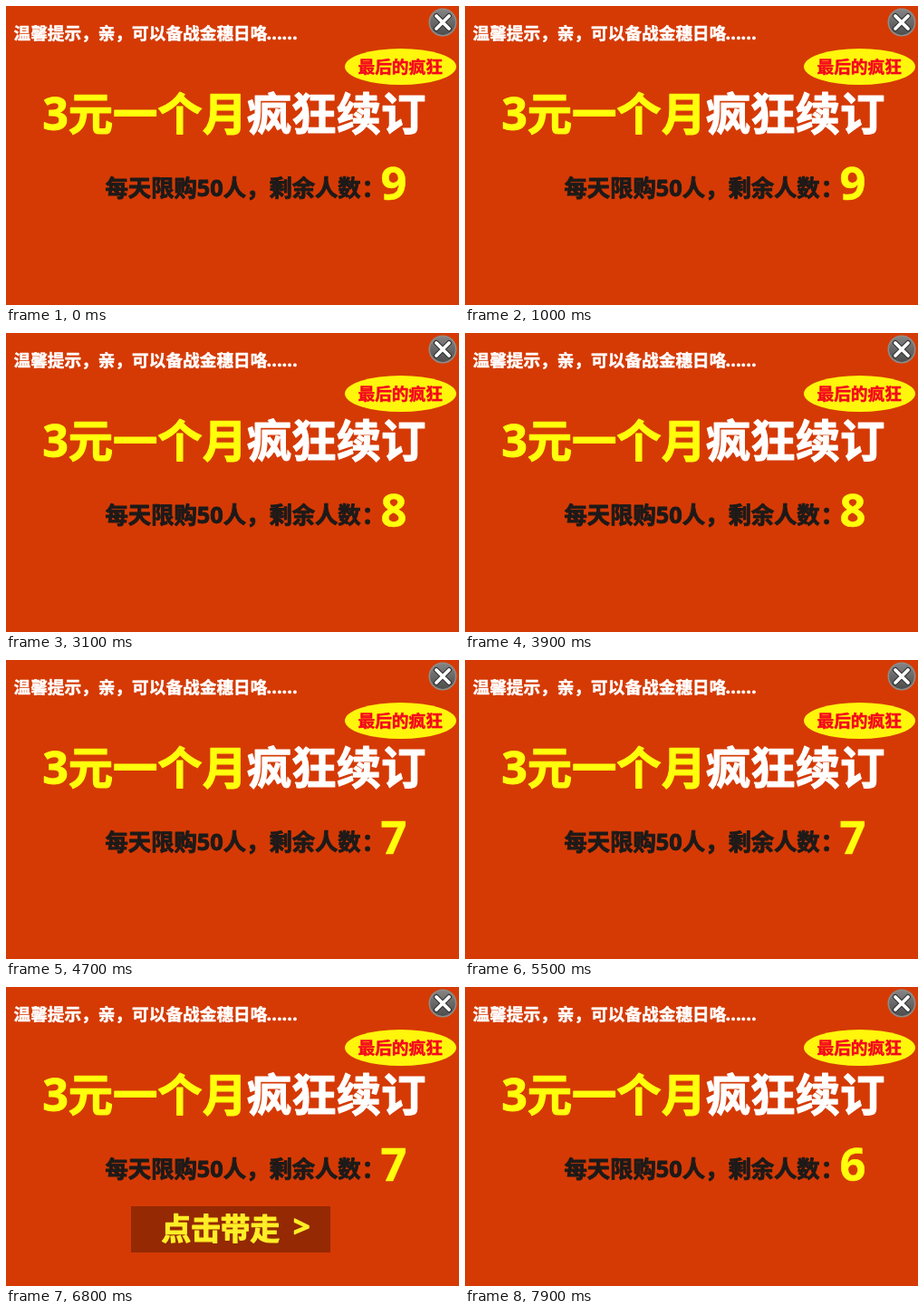
Animation of 500x330 px, one loop 8000 ms. Source, as an HTML page:

```html
<!DOCTYPE html>
<html lang="zh-CN">
<head>
<meta charset="utf-8">
<style>
html, body { margin: 0; width: 100%; height: 100%; overflow: hidden; background: #d53a04; }
svg { display: block; width: 500px; height: 330px; }
text {
  font: bold 18.67px "Open Sans", "Noto Sans CJK SC", "Noto Sans CJK", sans-serif;
  white-space: pre; stroke-linejoin: round; stroke-width: .5;
}
.yellow { fill: #ffff0c; stroke: #ffff0c; }
.white { fill: #fff; stroke: #fff; }
.red { fill: #f5081c; stroke: #f5081c; }
.dark { fill: #1d1a19; stroke: #1d1a19; stroke-width: .9; font-size: 25.33px; }
.title { font-size: 49.33px; stroke-width: 1.2; }
#count { font-size: 50.67px; }
#button text { fill: #ffee26; stroke: #ffee26; stroke-width: 1.2; font-size: 32.7px; }
#button .label { font-weight: 900; }
</style>
</head>
<body>
<svg viewBox="0 0 500 330">
  <defs>
    <linearGradient id="steel" x2="0" y2="1">
      <stop stop-color="#858585"/>
      <stop offset="1" stop-color="#4c4c4c"/>
    </linearGradient>
    <path id="cross" d="M475 11l14 14M489 11l-14 14" stroke-linecap="round"/>
  </defs>
  <rect width="500" height="330" fill="#d53a04"/>

  <text class="white" x="8.5" y="36.5">温馨提示，亲，可以备战金穗日咯</text>
  <text class="white" x="287.5" y="36.5" style="font-size:20px">......</text>

  <circle cx="482" cy="18" r="14.7" fill="url(#steel)" stroke="#8f8b88" stroke-width="1.6"/>
  <use href="#cross" stroke="#333" stroke-width="6"/>
  <use href="#cross" stroke="#fff" stroke-width="3.8"/>

  <ellipse cx="435.5" cy="67" rx="61.5" ry="20" fill="#fff60c"/>
  <text class="red" x="388.5" y="74">最后的疯狂</text>

  <text class="title yellow" x="40.5" y="137.3">3元一个月<tspan class="white">疯狂续订</tspan></text>

  <text class="dark" x="109.5" y="210.3">每天限购50人，剩余人数<tspan dx="1">：</tspan></text>
  <text id="count" class="yellow" x="413.5" y="214.3">9</text>

  <g id="button">
    <rect x="138" y="242" width="220" height="51" opacity=".3"/>
    <text class="label" x="171.5" y="279">点击带走</text>
    <text x="317" y="275.5">&gt;</text>
  </g>
</svg>
<script>
const LOOP = 8000, FAST = 1500, STEP = 2800;
const count = document.getElementById('count');
const button = document.getElementById('button');

function draw(now) {
  const t = now % LOOP;
  const late = t - FAST;
  // slow blinking first, then a short blink every 400 ms
  const lit = late < 0 ? t % 500 >= 200 : late % 400 >= 100;
  button.setAttribute('visibility', lit ? 'visible' : 'hidden');
  count.textContent = late < 0 ? 9 : 8 - Math.floor(late / STEP);
}

const start = performance.now();
function tick() {
  draw(performance.now() - start);
  requestAnimationFrame(tick);
}
tick();
</script>
</body>
</html>
```
